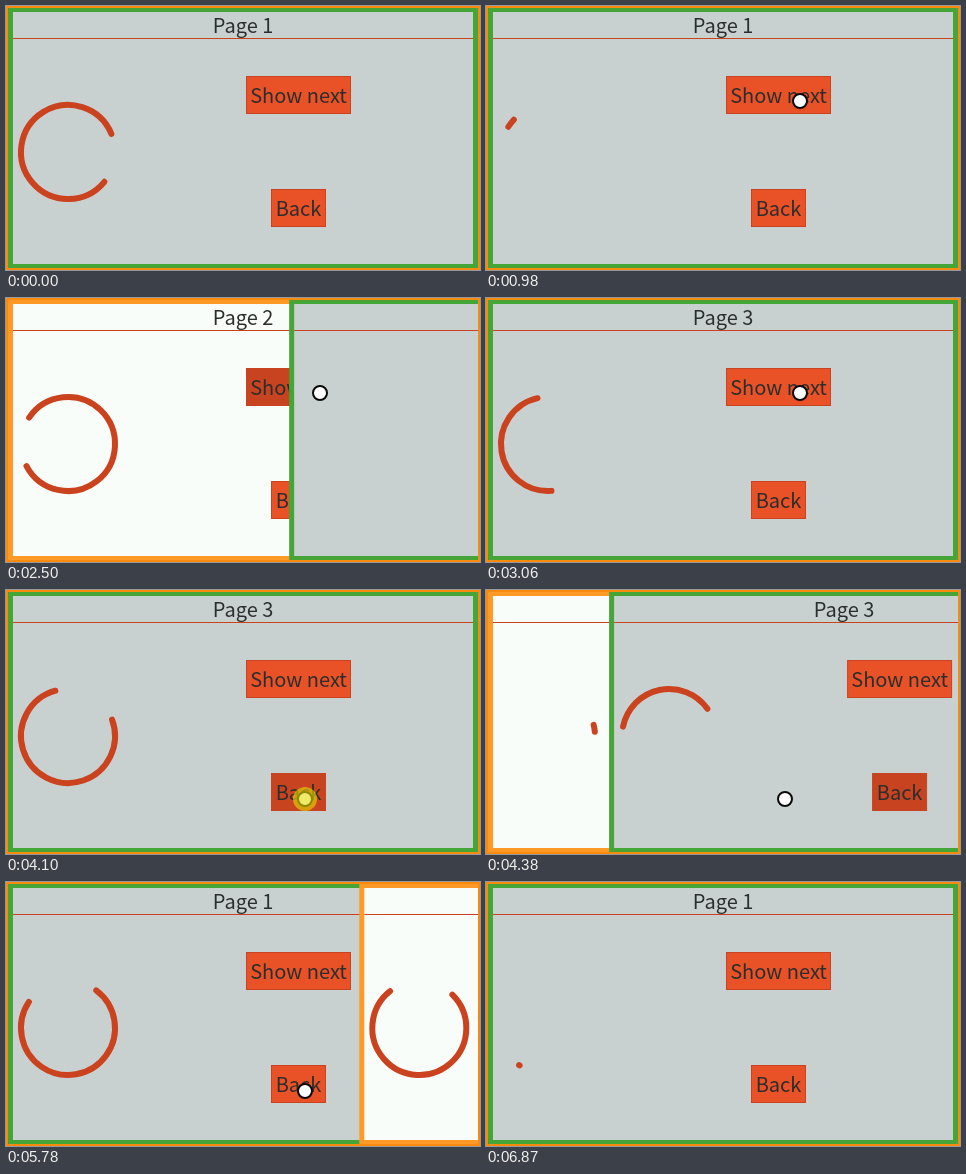
Animation of 474x264 px, one loop 6.94 s. Source, as an HTML page:

```html
<!DOCTYPE html>
<html lang="en">
<head>
<meta charset="utf-8">
<title>Page stack</title>
<style>
  html, body { margin: 0; width: 100%; height: 100%; overflow: hidden; background: #f98a0c; }
  svg { display: block; width: 474px; height: 264px; }
  text { font: 300 20px "Noto Sans CJK SC", "Noto Sans CJK JP", "Noto Sans CJK", "Open Sans", sans-serif; fill: #2b2e2e; text-anchor: middle; }
</style>
</head>
<body>
<svg id="stage" viewBox="0 0 474 264" xmlns="http://www.w3.org/2000/svg">
  <clipPath id="window"><rect x="2" y="2" width="470" height="260"/></clipPath>
  <rect id="frame" width="474" height="264" fill="#f98a0c"/>
  <g id="pages" clip-path="url(#window)"></g>
  <g id="pointer">
    <circle r="7" fill="#fff" stroke="#0a0a0a" stroke-width="2"/>
    <circle id="ring" r="12" fill="#e6de00" fill-opacity="0.6"/>
  </g>
</svg>
<script>
const LOOP = 6940, SLIDE = 560, HALF = 1332, SWEEP = 298.5;
const GROW_RATE = 0.2135, SHRINK_RATE = 0.251;
const HOT = '#e95127', DARK = '#c8431f';

const clamp = v => Math.min(1, Math.max(0, v));
const inOut = v => v < 0.5 ? 2 * v * v : 1 - 2 * (1 - v) ** 2;
const between = (t, [from, to]) => t >= from && t < to;
const ramp = (t, from, span) => inOut(clamp((t - from) / span));

// cubic-bezier(.4, 0, .2, 1), solved by bisection
function standard(x) {
  let lo = 0, hi = 1;
  for (let i = 0; i < 24; i++) {
    const s = (lo + hi) / 2, r = 1 - s;
    if (1.2 * s * r * r + 0.6 * s * s * r + s ** 3 < x) lo = s; else hi = s;
  }
  return lo * lo * (3 - 2 * lo);
}

function add(parent, tag, attrs, label) {
  const node = document.createElementNS('http://www.w3.org/2000/svg', tag);
  for (const key in attrs) node.setAttribute(key, attrs[key]);
  if (label) node.textContent = label;
  return parent.appendChild(node);
}

function addButton(parent, label, x, y, width) {
  const box = add(parent, 'rect', { x: x + 0.5, y: y + 0.5, width: width - 1, height: 37, fill: HOT, stroke: DARK });
  add(parent, 'text', { x: x + width / 2, y: y + 27 }, label);
  return box;
}

// runs: when a page's spinner starts, and its angle then
const pages = [
  { border: '#45a536', fill: '#c9d1d0', runs: [[-1366, -254.3], [4206, -70.2]],
    show: [[1000, 1600]], back: [] },
  { border: '#ff9a28', fill: '#f8fdf9', enter: 1040, leave: 5420, runs: [[1256, -51.6], [4241, -43.6]],
    show: [[2170, 2810]], back: [[5300, 5980]] },
  { border: '#45a536', fill: '#c9d1d0', enter: 2250, leave: 4180, runs: [[2553, -22.7]],
    show: [], back: [[4060, 4740]] }
];
const presses = [[1000, 1160], [2170, 2330], [4060, 4220], [5300, 5460]];

pages.forEach((page, i) => {
  const g = page.node = add(document.getElementById('pages'), 'g', {});
  add(g, 'rect', { x: 2, y: 2, width: 470, height: 260, fill: page.border });
  add(g, 'rect', { x: 7, y: 6, width: 460, height: 252, fill: page.fill });
  add(g, 'rect', { x: 7, y: 32, width: 460, height: 1, fill: DARK });
  add(g, 'text', { x: 237, y: 27 }, 'Page ' + (i + 1));
  page.showBox = addButton(g, 'Show next', 240, 70, 105);
  page.backBox = addButton(g, 'Back', 265, 183, 55);
  page.arc = add(g, 'path', { fill: 'none', stroke: '#ca421e', 'stroke-width': 6, 'stroke-linecap': 'round' });
});

function spinnerPath(age, origin) {
  if (age < 0) return '';
  const cycle = Math.floor(age / (2 * HALF)), local = age - cycle * 2 * HALF;
  const turn = HALF * (GROW_RATE + SHRINK_RATE) + SWEEP;
  const base = origin + cycle * turn;
  let tail, head;
  if (local < HALF) {
    tail = base + GROW_RATE * local;
    head = tail + SWEEP * standard(local / HALF);
  } else {
    head = base + GROW_RATE * HALF + SWEEP + SHRINK_RATE * (local - HALF);
    tail = head - SWEEP * (1 - standard(local / HALF - 1));
  }
  head = Math.max(head, tail + 0.7);
  const point = deg => {
    const a = deg * Math.PI / 180;
    return (62 + 47 * Math.cos(a)).toFixed(2) + ' ' + (146 + 47 * Math.sin(a)).toFixed(2);
  };
  return `M${point(tail)}A47 47 0 ${head - tail > 180 ? 1 : 0} 1 ${point(head)}`;
}

function pointerAt(t) {
  if (t < 630 || t >= 6850) return null;
  if (t < 2920) {
    const s = ramp(t, 610, 350), r = 1 - s;
    return [r * r * 444 + 2 * r * s * 372 + s * s * 314, r * r * 84 + 2 * r * s * 74 + s * s * 95];
  }
  const down = ramp(t, 3060, 460), out = ramp(t, 6560, 280);
  return [314 - 15 * down - 8 * out, 95 + 114 * down + 39 * out];
}

const pointer = document.getElementById('pointer'), ring = document.getElementById('ring');
const setVisible = (node, on) => node.setAttribute('visibility', on ? 'visible' : 'hidden');

function draw(t) {
  for (const page of pages) {
    const shown = page.enter === undefined ? 1 : ramp(t, page.enter, SLIDE) - ramp(t, page.leave, SLIDE);
    page.node.setAttribute('display', shown > 0 ? 'inline' : 'none');
    page.node.setAttribute('transform', `translate(${(470 * (1 - shown)).toFixed(2)} 0)`);
    const later = page.runs[1];
    const [start, origin] = later && t > 3500 ? later : page.runs[0];
    page.arc.setAttribute('d', spinnerPath(t - start, origin));
    const held = spans => spans.some(span => between(t, span)) ? DARK : HOT;
    page.showBox.setAttribute('fill', held(page.show));
    page.backBox.setAttribute('fill', held(page.back));
  }
  const at = pointerAt(t);
  pointer.setAttribute('display', at ? 'inline' : 'none');
  if (at) pointer.setAttribute('transform', `translate(${at[0].toFixed(2)} ${at[1].toFixed(2)})`);
  setVisible(ring, presses.some(span => between(t, span)));
}

const begin = performance.now();
function tick() {
  draw((performance.now() - begin) % LOOP);
  requestAnimationFrame(tick);
}
draw(0);
requestAnimationFrame(tick);
</script>
</body>
</html>
```
